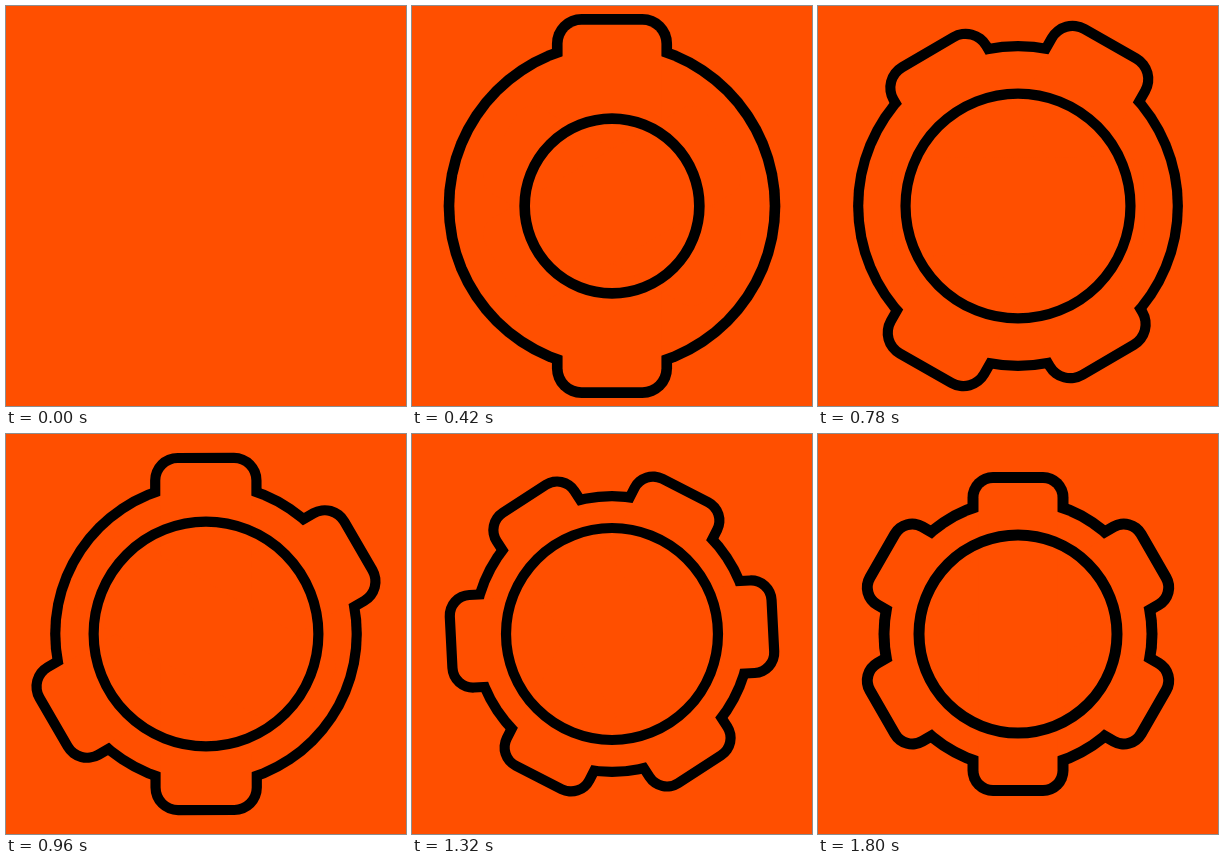
An HTML page without scripts that plays this animation: 400 by 400 pixels, repeating every 1830 ms.

```html
<!DOCTYPE html>
<html lang="en">
<head>
<meta charset="utf-8">
<title>Gear</title>
<style>
  @property --size { syntax: "<number>"; inherits: true; initial-value: 0; }
  @property --turn { syntax: "<angle>"; inherits: true; initial-value: 0deg; }
  @property --half { syntax: "<length>"; inherits: true; initial-value: 5.5px; }
  @property --hole { syntax: "<length>"; inherits: true; initial-value: 0px; }
  @property --bar1 { syntax: "<length>"; inherits: true; initial-value: 110px; }
  @property --bar2 { syntax: "<length>"; inherits: true; initial-value: 110px; }
  @property --bar3 { syntax: "<length>"; inherits: true; initial-value: 110px; }

  html, body { margin: 0; width: 100%; height: 100%; overflow: hidden; background: #ff4f00; }
  svg {
    display: block; width: 100%; height: 100%;
    animation: 1830ms linear infinite;
    animation-name: show, size, turn, line, hole, bar1, bar2, bar3;
  }

  /* The outline is a grown black gear under a shrunken orange one. */
  .grown { --sign: 1; fill: #000; }
  .shrunk { --sign: -1; fill: #ff4f00; }
  .ring { r: calc(134px * var(--size) + var(--half) * var(--sign)); }
  .bar {
    x: calc(-45px * var(--size) - var(--half) * var(--sign));
    y: calc(-1 * var(--reach) * var(--size) - var(--half) * var(--sign));
    width: calc(90px * var(--size) + 2 * var(--half) * var(--sign));
    height: calc(2 * var(--reach) * var(--size) + 2 * var(--half) * var(--sign));
    rx: calc(20px * var(--size) + var(--half) * var(--sign));
    transform: rotate(calc(var(--turn) + var(--at)));
  }
  .b1 { --reach: var(--bar1); --at: 0deg; }
  .b2 { --reach: var(--bar2); --at: 120deg; }
  .b3 { --reach: var(--bar3); --at: 60deg; }
  .hole { r: var(--hole); fill: none; stroke: #000; stroke-width: calc(2 * var(--half)); }

  @keyframes show {
    0%, .8% { opacity: 0; }
    .81%, 100% { opacity: 1; }
  }
  @keyframes size {
    0% { --size: 0; animation-timing-function: cubic-bezier(.3, .05, .3, 1); }
    24.6%, 32.8% { --size: 1.22; animation-timing-function: cubic-bezier(.3, .05, .28, 1); }
    98.3%, 100% { --size: 1; }
  }
  @keyframes turn {
    0%, 32.5% { --turn: 0deg; animation-timing-function: ease-in-out; }
    53% { --turn: 60deg; animation-timing-function: ease-in-out; }
    93.7%, 100% { --turn: 120deg; }
  }
  @keyframes line {
    0%, 14.8% { --half: 5.5px; }
    34.4%, 72% { --half: 5.1px; }
    98.3%, 100% { --half: 5.5px; }
  }
  @keyframes hole {
    0%, 2.5% { --hole: 0px; animation-timing-function: cubic-bezier(.4, .1, .7, .7); }
    14.75% { --hole: 60px; animation-timing-function: cubic-bezier(.3, .45, .6, .9); }
    34.43% { --hole: 107px; animation-timing-function: cubic-bezier(.3, .5, .6, 1); }
    46% { --hole: 113px; animation-timing-function: cubic-bezier(.4, 0, .7, .7); }
    72.13% { --hole: 106px; }
    85.25% { --hole: 101px; animation-timing-function: ease-out; }
    98.3%, 100% { --hole: 99px; }
  }
  @keyframes bar1 {
    0%, 9.8% { --bar1: 110px; }
    14.75% { --bar1: 140.2px; animation-timing-function: ease-out; }
    27.9%, 100% { --bar1: 156.5px; }
  }
  @keyframes bar2 {
    0%, 30% { --bar2: 110px; }
    34.43% { --bar2: 134px; animation-timing-function: ease-out; }
    50.8%, 100% { --bar2: 156.5px; }
  }
  @keyframes bar3 {
    0%, 50.8% { --bar3: 110px; }
    54.6% { --bar3: 134px; animation-timing-function: ease-out; }
    70.5%, 100% { --bar3: 156.5px; }
  }
</style>
</head>
<body>
<svg viewBox="0 0 400 400">
  <g transform="translate(200 200)">
    <g class="grown">
      <circle class="ring"/>
      <rect class="bar b1"/>
      <rect class="bar b2"/>
      <rect class="bar b3"/>
    </g>
    <g class="shrunk">
      <circle class="ring"/>
      <rect class="bar b1"/>
      <rect class="bar b2"/>
      <rect class="bar b3"/>
    </g>
    <circle class="hole"/>
  </g>
</svg>
</body>
</html>
```
